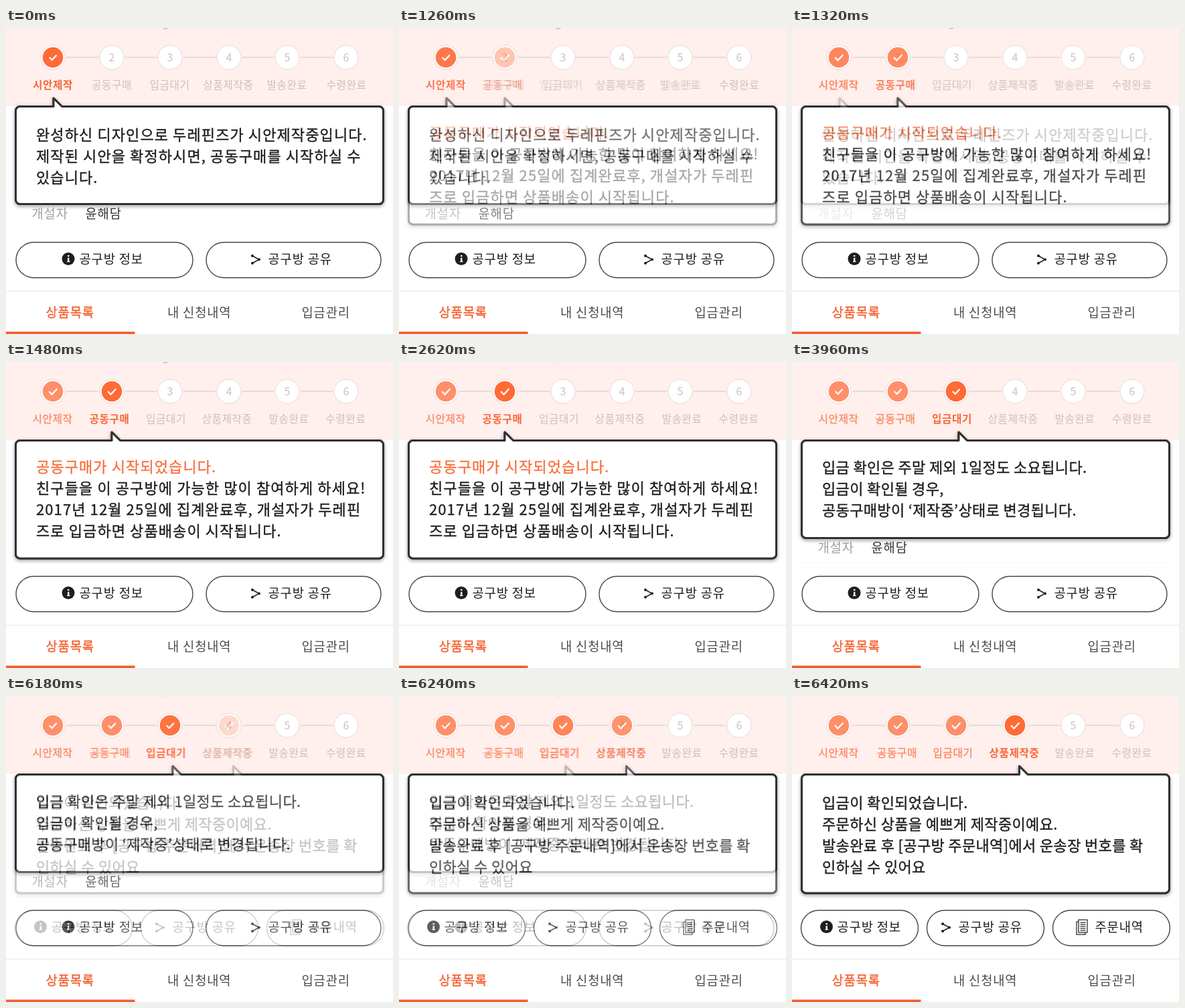
Recreate the animation shown at these times as an HTML page with a canvas. Size 578 by 458 pixels, loop 8000 ms.

```html
<!DOCTYPE html>
<html lang="ko">
<head>
<meta charset="utf-8">
<title>공구방 진행 단계</title>
<style>
html, body { margin: 0; width: 100%; height: 100%; overflow: hidden; background: #fff; }
canvas { display: block; }
</style>
</head>
<body>
<canvas id="stage" width="578" height="458"></canvas>
<script>
const W = 578, H = 458, LOOP = 8000;
const FONT = '"Noto Sans CJK KR", "Noto Sans KR", "Noto Sans CJK", sans-serif';
const ORANGE = '#ff6a35', DONE = '#ff8f69', INK = '#1e1e20', PALE = '#c9c1c0';

// font size and letter spacing
const STEP = [15.7, 0.6], NUMBER = [16, 0], BODY = 22, UI = [18.8, 0.8];

const stepX = [70, 158, 245, 333, 420, 508];
const stepNames = ['시안제작', '공동구매', '입금대기', '상품제작중', '발송완료', '수령완료'];

const scenes = [
  {
    labelX: [70, 158, 244.5, 332, 419.5, 508.5],
    tail: 71, bottom: 263.5, spacing: 1.1, top: 160, check: 0.85,
    lines: ['완성하신 디자인으로 두레핀즈가 시안제작중입니다.',
            '제작된 시안을 확정하시면, 공동구매를 시작하실 수',
            '있습니다.']
  },
  {
    labelX: [69.5, 154.5, 239, 330, 422.5, 507.5],
    tail: 158, bottom: 294, spacing: 1.1, top: 157, check: 1, accent: true,
    lines: ['공동구매가 시작되었습니다.',
            '친구들을 이 공구방에 가능한 많이 참여하게 하세요!',
            '2017년 12월 25일에 집계완료후, 개설자가 두레핀',
            '즈로 입금하면 상품배송이 시작됩니다.']
  },
  {
    labelX: [69.5, 154.5, 239, 330, 422.5, 508],
    tail: 249, bottom: 263.5, spacing: 0.35, top: 158, check: 0.85, rule: true,
    lines: ['입금 확인은 주말 제외 1일정도 소요됩니다.',
            '입금이 확인될 경우,',
            '공동구매방이 ‘제작중’상태로 변경됩니다.']
  },
  {
    labelX: [69.5, 157, 240.5, 332, 422.5, 507.5],
    tail: 339.5, bottom: 295, spacing: 0.35, top: 160, check: 1, orders: true,
    lines: ['입금이 확인되었습니다.',
            '주문하신 상품을 예쁘게 제작중이예요.',
            '발송완료 후 [공구방 주문내역]에서 운송장 번호를 확',
            '인하실 수 있어요']
  }
];

// y is the middle of the line
function text(g, str, x, y, [size, spacing], color, weight = 400, align = 'left') {
  g.font = `${weight} ${size}px ${FONT}`;
  g.letterSpacing = spacing + 'px';
  g.textAlign = align;
  g.fillStyle = g.strokeStyle = color;
  const base = y + size * 0.37;
  g.fillText(str, x, base);
  if (weight === 500) {
    g.lineWidth = 0.35;
    g.strokeText(str, x, base);
  }
}

function disc(g, x, y, r, fill) {
  g.beginPath();
  g.arc(x, y, r, 0, Math.PI * 2);
  g.fillStyle = fill;
  g.fill();
}

function path(g, points, color, width) {
  g.beginPath();
  points.forEach(([x, y]) => g.lineTo(x, y));
  g.strokeStyle = color;
  g.lineWidth = width;
  g.stroke();
}

function drawSteps(g, scene, active) {
  path(g, [[70, 44], [508, 44]], '#ddd6d6', 1.5);
  stepX.forEach((x, i) => {
    disc(g, x, 44, 20, '#ffefed');
    disc(g, x, 44, 18, '#fff');
    g.strokeStyle = '#e4dbd9';
    g.lineWidth = 1;
    g.stroke();
    if (i > active) {
      text(g, String(i + 1), x, 44, NUMBER, PALE, 400, 'center');
    } else {
      const k = scene.check;
      disc(g, x, 44, 15.3, i === active ? ORANGE : DONE);
      path(g, [[x - 6 * k, 44], [x - 1.5 * k, 44 + 4.5 * k], [x + 6.5 * k, 44 - 4 * k]], '#fff', 2.3);
    }
    const [color, weight] = i > active ? [PALE, 400] : i === active ? ['#fa6636', 700] : ['#fa8a66', 500];
    text(g, stepNames[i], scene.labelX[i], 85, STEP, color, weight, 'center');
  });
}

function drawBubble(g, { tail, bottom, spacing, top, lines, accent }) {
  const l = 14.5, r = 563.5, t = 117.5, c = 6.5;
  g.beginPath();
  g.moveTo(l + c, t);
  g.lineTo(tail, t);
  g.lineTo(tail, 105);
  g.lineTo(tail + 12.5, t);
  g.arcTo(r, t, r, bottom, c);
  g.arcTo(r, bottom, l, bottom, c);
  g.arcTo(l, bottom, l, t, c);
  g.arcTo(l, t, r, t, c);
  g.closePath();
  g.save();
  g.lineJoin = 'round';
  g.strokeStyle = '#303033';
  g.lineWidth = 3;
  g.shadowColor = 'rgba(0,0,0,0.5)';
  g.shadowBlur = 5;
  g.shadowOffsetY = 2;
  g.stroke();
  g.shadowColor = 'transparent';
  g.fillStyle = '#fff';
  g.fill();
  g.stroke();
  g.restore();
  lines.forEach((line, i) =>
    text(g, line, 45, top + 32 * i, [BODY, spacing], accent && !i ? '#f8703f' : INK, 500));
}

function pill(g, x, w) {
  g.beginPath();
  g.roundRect(x, 320.7, w, 53, 26.5);
  g.fillStyle = '#fff';
  g.fill();
  g.strokeStyle = '#48484a';
  g.lineWidth = 1.4;
  g.stroke();
}

function infoIcon(g, x) {
  disc(g, x, 345.5, 9.5, INK);
  g.fillStyle = '#fff';
  g.fillRect(x - 1, 340, 2.4, 2.3);
  g.fillRect(x - 1, 344, 2.4, 6);
  g.fillRect(x - 2, 349, 4.5, 1.3);
}

function shareIcon(g, x) {
  const dots = [[x - 5, 341], [x + 5, 346.5], [x - 5, 352]];
  path(g, dots, INK, 1.5);
  dots.forEach(([a, b]) => disc(g, a, b, 2, INK));
}

function docIcon(g, x) {
  g.strokeStyle = INK;
  g.lineWidth = 1.2;
  g.strokeRect(x - 8, 338, 13, 19);
  g.fillStyle = '#fff';
  g.fillRect(x - 5, 335, 13, 19);
  g.strokeRect(x - 5, 335, 13, 19);
  for (let y = 339; y < 353; y += 3) path(g, [[x - 2.5, y], [x + 5.5, y]], INK, 1.2);
}

function drawButtons(g, orders) {
  const label = (str, x) => text(g, str, x, 346.5, UI, INK);
  if (orders) {
    [13.5, 201.5, 389.5].forEach(x => pill(g, x, 175));
    infoIcon(g, 51.5);
    shareIcon(g, 230);
    docIcon(g, 433);
    label('공구방 정보', 67.5);
    label('공구방 공유', 248.5);
    label('주문내역', 452.5);
  } else {
    pill(g, 15, 264);
    pill(g, 299, 261);
    infoIcon(g, 93);
    shareIcon(g, 373);
    label('공구방 정보', 109.5);
    label('공구방 공유', 391.5);
  }
}

function drawTabs(g) {
  g.fillStyle = '#e6e6e6';
  g.fillRect(0, 393.5, W, 1);
  text(g, '상품목록', 59.5, 426.5, UI, '#f4612f', 500);
  text(g, '내 신청내역', 241, 426.5, UI, '#4c4c4e');
  text(g, '입금관리', 441.5, 426.5, UI, '#4c4c4e');
  g.fillStyle = '#f25c30';
  g.fillRect(0, 454.5, 192.5, 3.5);
}

function render(scene, index) {
  const layer = document.createElement('canvas');
  layer.width = W;
  layer.height = H;
  const g = layer.getContext('2d');
  g.fillStyle = '#fff';
  g.fillRect(0, 0, W, H);
  g.fillStyle = '#ffefed';
  g.fillRect(0, 0, W, 116.5);
  drawSteps(g, scene, index);
  text(g, '개설자', 38.5, 278.5, UI, '#a0a0a0');
  text(g, '윤해담', 118.5, 278.5, UI, '#333');
  if (scene.rule) {
    g.fillStyle = '#f7f7f7';
    g.fillRect(14, 300, 549, 1);
  }
  drawBubble(g, scene);
  drawButtons(g, scene.orders);
  drawTabs(g);
  return layer;
}

const layers = scenes.map(render);
const ctx = document.getElementById('stage').getContext('2d');

// each fade shows from "at", already "lead" ms into its curve
const FADE = 240;
const fades = [{ at: 1260, lead: 36 }, { at: 3740, lead: 38 }, { at: 6180, lead: 22 }];

function paint(t) {
  let index = 0, mix = 1;
  fades.forEach(({ at, lead }, i) => {
    if (t < at) return;
    const u = Math.min(1, (t - at + lead) / FADE);
    index = i + 1;
    mix = 1 - (1 - u) ** 3;
  });
  ctx.globalAlpha = 1;
  if (mix < 1) ctx.drawImage(layers[index - 1], 0, 0);
  ctx.globalAlpha = mix;
  ctx.drawImage(layers[index], 0, 0);
  ctx.globalAlpha = t < 2620 ? 1 : 0.15;
  ctx.beginPath();
  ctx.ellipse(238, -0.5, 4, 2.3, 0, 0, Math.PI * 2);
  ctx.fillStyle = '#cbc1bf';
  ctx.fill();
}

const start = performance.now();
function tick() {
  const t = (performance.now() - start) % LOOP;
  paint(Math.floor(t / 20) * 20);
  requestAnimationFrame(tick);
}
tick();
</script>
</body>
</html>
```
